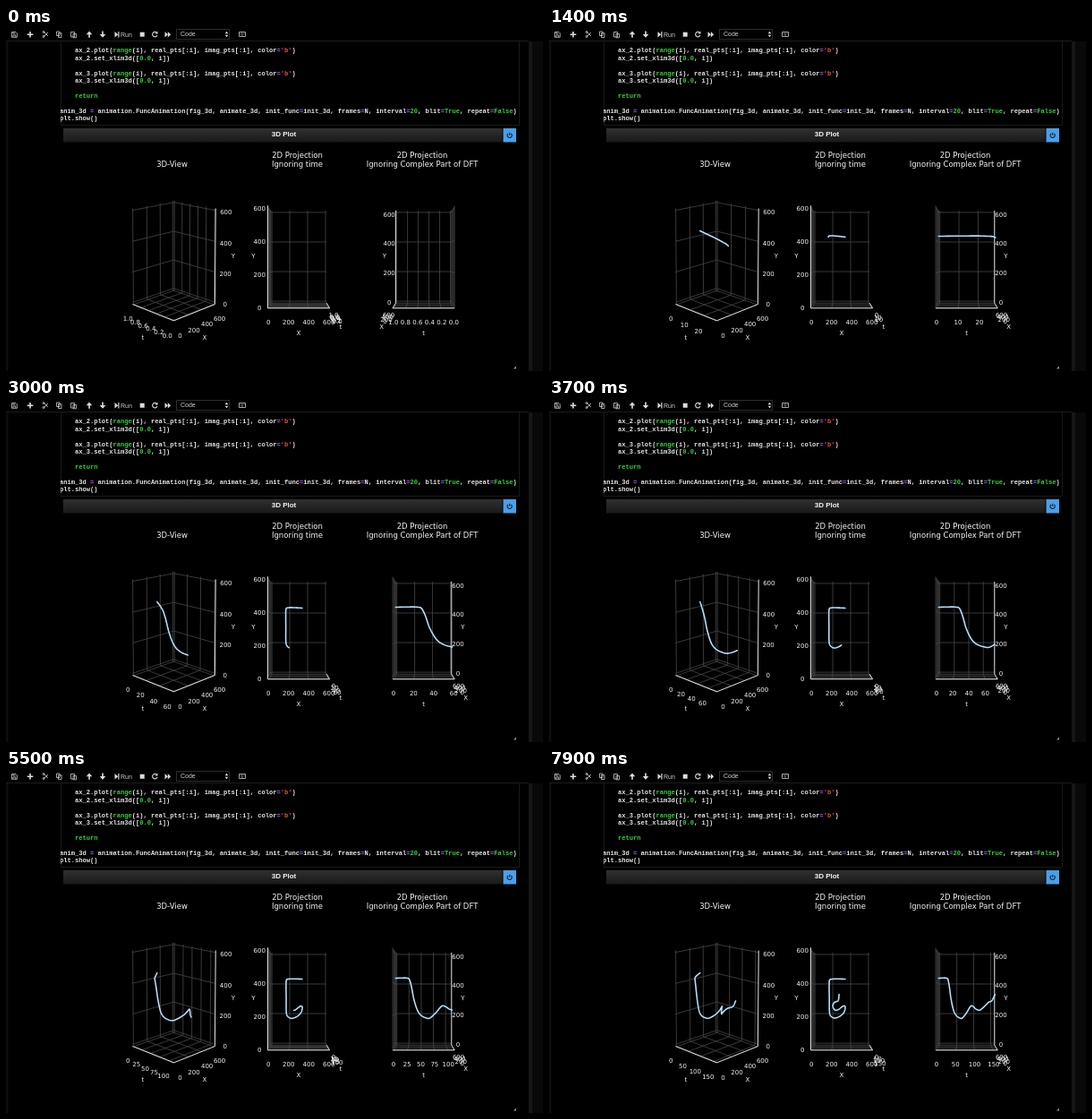
An HTML page that plays this animation: 600 by 383 pixels, repeating every 8000 ms.

```html
<!DOCTYPE html>
<html lang="en">
<head>
<meta charset="utf-8">
<title>3D Plot</title>
<style>
  html, body { margin: 0; width: 100%; height: 100%; overflow: hidden; background: #000; }
  svg { display: block; width: 100vw; height: 100vh; }
  text { fill: #f4f4f4; white-space: pre; }
  .ui { font: 7px "Liberation Sans", sans-serif; fill: #ccc; }
  .bar { font: bold 8px "Liberation Sans", sans-serif; }
  .code text { font: bold 7.1px "Liberation Mono", monospace; fill: #e6e6e6; }
  .code .g { fill: #35d435; }
  .code .s { fill: #e8504c; }
  .code .o { fill: #b35cff; }
  .title { font: 8.5px "DejaVu Sans", sans-serif; text-anchor: middle; }
  .plot text { font: 7px "DejaVu Sans", sans-serif; text-anchor: middle; }
  .grid { stroke: #484848; stroke-width: .8; fill: none; }
  .axis { stroke: #e8e8e8; stroke-width: 1; fill: none; }
  .curve { stroke: #b5def9; stroke-width: 1.6; fill: none; stroke-linejoin: round; stroke-linecap: round; }
  .icon { fill: #ddd; }
  .line { fill: none; stroke: #ccc; stroke-width: .8; }
</style>
</head>
<body>
<svg viewBox="0 0 600 383">
  <defs>
    <linearGradient id="shade" x2="0" y2="1">
      <stop stop-color="#303030"/><stop offset="1" stop-color="#191919"/>
    </linearGradient>
    <clipPath id="cell"><path d="M61 15H573V109H61z"/></clipPath>
  </defs>

  <path d="M0 15H2.5V383H0z" fill="#0e0e0e"/>
  <path d="M584 15H588V383H584z" fill="#161616"/>
  <path d="M588 15H600V383H588z" fill="#090909"/>
  <path d="M0 14.5H584" stroke="#1c1c1c"/>

  <g class="icon">
    <path d="M26.200 4h1.600v2.500h2.500v1.600h-2.500v2.500h-1.600V8.100h-2.500V6.500h2.500z"/>
    <path d="M93 3.500l3.300 3.700h-2.500v3.500h-1.600V7.200h-2.500z"/>
    <path d="M108 10.700l-3.300-3.700h2.500V3.500h1.600V7h2.500z"/>
    <path d="M121.500 4l3.700 3.250-3.700 3.250zM125.300 4h1.200v6.500h-1.200z"/>
    <path d="M149.700 4.700h5v5h-5z"/>
    <path d="M177.500 4l3.300 3.200-3.300 3.200zM180.800 4l3.300 3.200-3.300 3.200z"/>
    <path d="M169.500 3.500v3h-3z"/>
    <path d="M244.700 6.300l1.800-2.600 1.800 2.600zM244.700 7.700h3.600l-1.800 2.600z"/>
  </g>
  <g class="line">
    <path d="M6.500 4.500h4.500l1.300 1.300v4.500H6.500zM8 4.500v1.800h2.500M8 10v-2h2.700v2"/>
    <path d="M42 4l5 5M42 10l5-5"/>
    <circle cx="42" cy="4.500" r="1"/><circle cx="42" cy="9.500" r="1"/>
    <path d="M56.500 4h3.500v4.500h-3.500zM58.500 5.700h3.500v4.800h-3.500z"/>
    <path d="M72.500 4.500h4v5.500h-4zM75 6.500h3.500v4.300H75z"/>
    <path d="M168.500 5.500a2.700 2.700 0 1 0 .4 2.500" stroke-width="1.200"/>
    <path d="M260.500 4.500h7v5h-7z"/>
    <path d="M261.500 6.200h5M262.500 8h3" stroke-dasharray="1 .5"/>
  </g>
  <text class="ui" x="128" y="9.700">Run</text>
  <rect x="190.500" y="1.500" width="59" height="11" fill="none" stroke="#2c2c2c"/>
  <text class="ui" x="195" y="9.400">Code</text>

  <path d="M61.500 15V108.500H573.500V15" fill="none" stroke="#1a1a1a"/>
  <g class="code" id="code" clip-path="url(#cell)"></g>

  <path d="M64 112H554.500V127.500H64z" fill="url(#shade)"/>
  <path d="M555.500 112H570V127.500H555.500z" fill="#4b9fe8"/>
  <path d="M562.700 119.700v-3M561 117.900a2.600 2.600 0 1 0 3.400 0" fill="none" stroke="#0b2238" stroke-width="1.100"/>
  <text class="bar" x="310.500" y="121.300" text-anchor="middle">3D Plot</text>

  <g class="title">
    <text x="185.500" y="155.200">3D-View</text>
    <text x="325.500" y="145.300">2D Projection</text>
    <text x="325.500" y="155.200">Ignoring time</text>
    <text x="465" y="145.300">2D Projection</text>
    <text x="465" y="155.200">Ignoring Complex Part of DFT</text>
  </g>
  <g class="plot" id="plot"></g>
  <path d="M567 380.500l3-3v3z" fill="#999"/>
</svg>

<script>
const LOOP = 8000, STEP = 100;

// Notebook cell: {g:...} keyword or number, {s:...} string, {o:...} operator
const plotLine = n =>
  `    ax_${n}.plot({g:range}(i), real_pts[:i], imag_pts[:i], color{o:=}{s:'b'})`;
const limitLine = n => `    ax_${n}.set_xlim3d([{g:0.0}, i])`;
const code = [
  plotLine(2), limitLine(2), "", plotLine(3), limitLine(3), "", "    {g:return}", "",
  "anim_3d {o:=} animation.FuncAnimation(fig_3d, animate_3d, init_func{o:=}init_3d, " +
    "frames{o:=}N, interval{o:=}{g:20}, blit{o:=}{g:True}, repeat{o:=}{g:False})",
  "plt.show()"
];
document.getElementById("code").innerHTML = code.map((line, row) =>
  `<text x="59.9" y="${27.3 + row * 8.4}">` +
  line.replace(/\{(\w):(.+?)\}/g, '<tspan class="$1">$2</tspan>') + "</text>").join("");

// Traced stroke: [index, real, imaginary]
const knots = [
  [0, 340, 433], [14, 250, 433], [24, 184, 430], [28, 165, 421], [32, 163, 373],
  [36, 165, 303], [43, 166, 230], [50, 173, 197], [60, 202, 179], [66, 235, 176],
  [72, 285, 189], [80, 325, 214], [88, 338, 245], [92, 330, 255], [98, 305, 250],
  [104, 275, 236], [110, 252, 229], [114, 238, 227], [120, 222, 235], [130, 208, 256],
  [140, 226, 278], [150, 265, 290], [158, 274, 327]
];

function slope(j, c) {
  const a = knots[Math.max(j - 1, 0)], b = knots[Math.min(j + 1, knots.length - 1)];
  return (b[c] - a[c]) / (b[0] - a[0]);
}

function sample(k) {
  let j = 0;
  while (j < knots.length - 2 && knots[j + 1][0] <= k) j++;
  const a = knots[j], b = knots[j + 1], h = b[0] - a[0], s = (k - a[0]) / h;
  return [1, 2].map(c =>
    a[c] * (1 + 2 * s) * (1 - s) ** 2 + b[c] * s * s * (3 - 2 * s) +
    h * (slope(j, c) * s * (1 - s) ** 2 - slope(j + 1, c) * s * s * (1 - s)));
}
const stroke = Array.from({ length: 159 }, (_, k) => sample(k));

// Perspective of a unit cube centred on the origin, stretched vertically
const EDGE = .5208, TICK = .65, LABEL = .745, EYE = 10;
const SCALE_X = 63, SCALE_Y = 104.3, CENTER_Y = 255.5;

function project(view, [x, y, z]) {
  const a = view.azim * Math.PI / 180, e = view.elev * Math.PI / 180;
  const right = y * Math.cos(a) - x * Math.sin(a);
  const toward = x * Math.cos(a) + y * Math.sin(a);
  const up = z * Math.cos(e) - toward * Math.sin(e);
  const f = EYE / (EYE - toward * Math.cos(e) - z * Math.sin(e));
  return [view.cx + right * SCALE_X * f, CENTER_Y - up * SCALE_Y * f].map(v => v.toFixed(2));
}

// walls: side of each pane; sides: the edge carrying the t, X and Y axis
function makeViews(flip) {
  const s = flip ? -1 : 1;
  return [
    { cx: 187.4, azim: -45, elev: 10, walls: [-1, 1, -1], sides: [[0, -1, -1], [1, 0, -1], [1, 1, 0]] },
    { cx: 327, azim: 0, elev: 0, walls: [-1, -1, -1], sides: [[0, 1, -1], [1, 0, -1], [1, -1, 0]] },
    { cx: 466.6, azim: -90, elev: 0, walls: [-s, 1, -1], sides: [[0, -1, -1], [s, 0, -1], [s, 1, 0]] }
  ];
}

function ticksTo(max) {
  const base = 10 ** Math.floor(Math.log10(max / 5.2));
  const step = [1, 2, 2.5, 5, 10].map(m => m * base).find(m => max / m <= 5.2);
  const digits = step % 1 ? 1 : 0, ticks = [];
  for (let v = 0; v <= max + 1e-6; v += step) ticks.push([v / max - .5, v.toFixed(digits)]);
  return ticks;
}

const path = (view, points, cls) =>
  `<path class="${cls}" d="M${points.map(p => project(view, p)).join("L")}"/>`;

function label(view, point, str, drop) {
  const [x, y] = project(view, point);
  return `<text x="${x}" y="${y}" dy="${drop}em">${str}</text>`;
}

function drawView(view, tTicks, count) {
  const planeTicks = ticksTo(600).filter(t => t[1] % 200 === 0);
  const ticks = [tTicks, planeTicks, planeTicks];
  let grid = "", axes = "", text = "";

  for (let a = 0; a < 3; a++) {
    const at = (pos, reach) => view.sides[a].map((s, d) => d === a ? pos : s * reach);
    const upright = a === 2;
    axes += path(view, [at(-EDGE, EDGE), at(EDGE, EDGE)], "axis");
    text += label(view, at(0, LABEL), "tXY"[a], upright ? .2 : .46);
    for (const [pos, str] of ticks[a]) {
      text += label(view, at(pos, TICK), str, upright ? .6 : .46);
      for (let b = 0; b < 3; b++) {
        if (b === a) continue;
        const ends = [-EDGE, EDGE].map(end =>
          view.walls.map((w, d) => d === a ? pos : d === b ? w * EDGE : end));
        grid += path(view, ends, "grid");
      }
    }
  }
  const points = stroke.slice(0, count + 1)
    .map(([re, im], k) => [k / count - .5, re / 600 - .5, im / 600 - .5]);
  return grid + axes + (count ? path(view, points, "curve") : "") + text;
}

const plot = document.getElementById("plot");
let shown = -1;

function render() {
  const n = Math.floor(performance.now() % LOOP / STEP);
  if (n !== shown) {
    shown = n;
    const idle = n < 2, count = idle ? 0 : 2 * n;
    const tTicks = idle
      ? ticksTo(1).map(([pos, str]) => [-pos, str])
      : ticksTo(count);
    plot.innerHTML = makeViews(idle).map(view => drawView(view, tTicks, count)).join("");
  }
  requestAnimationFrame(render);
}
render();
</script>
</body>
</html>
```
